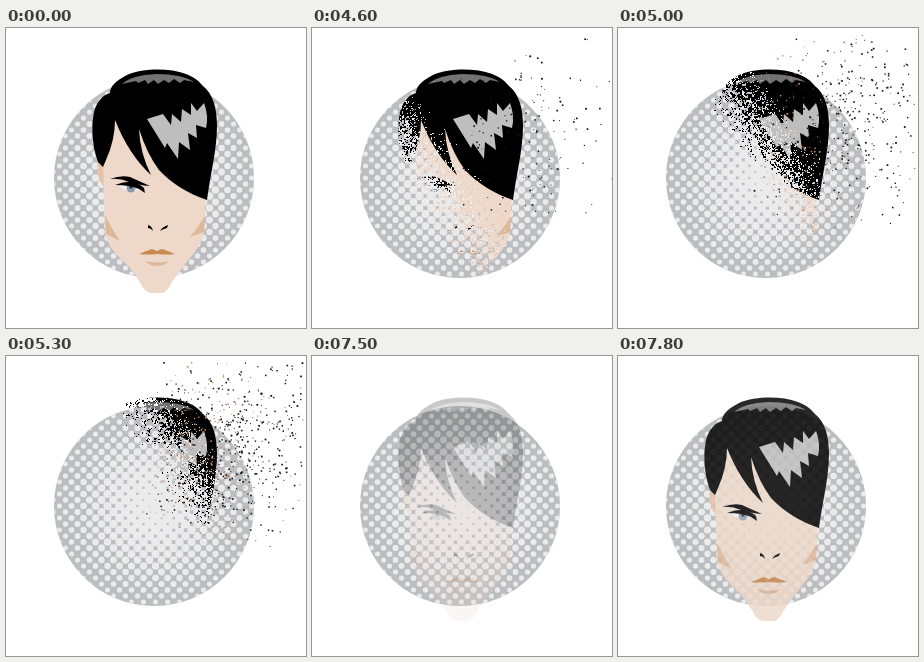
Animation of 300 by 300 pixels, one loop 7.9 s. Source, as an HTML page with a canvas:

```html
<!DOCTYPE html>
<html lang="en">
<head>
<meta charset="utf-8">
<title>Dissolving portrait</title>
<style>
html, body { margin: 0; width: 100%; height: 100%; overflow: hidden; background: #fff; }
canvas { display: block; width: 300px; height: 300px; }
</style>
</head>
<body>
<canvas id="stage" width="300" height="300"></canvas>
<script>
const SIZE = 300, LOOP = 7900, STEP = 100;
const DISSOLVE = 4000, GONE = 6000, RETURN = 7500;
const ctx = document.getElementById('stage').getContext('2d');

function layer(draw) {
  const c = document.createElement('canvas');
  c.width = c.height = SIZE;
  const g = c.getContext('2d', { willReadFrequently: true });
  draw(g);
  return { c, g };
}

function seeded(seed) {
  return () => {
    seed = (seed + 0x6D2B79F5) | 0;
    let t = Math.imul(seed ^ (seed >>> 15), 1 | seed);
    t = (t + Math.imul(t ^ (t >>> 7), 61 | t)) ^ t;
    return ((t ^ (t >>> 14)) >>> 0) / 4294967296;
  };
}

function fill(g, color, path) {
  g.fillStyle = color;
  g.fill(new Path2D(path));
}

function disc(g, color, x, y, r) {
  g.fillStyle = color;
  g.beginPath();
  g.arc(x, y, r, 0, Math.PI * 2);
  g.fill();
}

// Halftone disc: staggered dots that grow towards the middle
const backdrop = layer(g => {
  g.fillStyle = '#fff';
  g.fillRect(0, 0, SIZE, SIZE);
  disc(g, '#bcbdc1', 148, 150, 100);
  g.save();
  g.beginPath();
  g.arc(148, 150, 100.5, 0, Math.PI * 2);
  g.clip();
  const pitch = 12;
  for (let row = -18; row <= 18; row++) {
    for (let col = -10; col <= 10; col++) {
      const dx = (col + (row & 1) / 2) * pitch, dy = row * pitch / 2;
      const d = Math.hypot(dx, dy);
      if (d < 108) disc(g, '#ebebec', 149.5 + dx, 150 + dy, 5.7 - d * 0.033);
    }
  }
  g.restore();
});

const portrait = layer(g => {
  const skin = '#edd8ca', tan = '#dfb799', ink = '#000';
  // ear, face and cheek shadows
  fill(g, '#e6c2a8', 'M92 130 Q90 142 94 153 L99 161 L104 132Z');
  fill(g, skin, 'M97 130 L98 165 L99 204 Q102 219 112 228 L123 239 Q130 247 135 256 Q139 265 146 265 L157 265 Q162 263 166 254 Q174 242 184 230 Q195 217 198 205 L200 165 L190 90 L105 85Z');
  fill(g, tan, 'M99 187 Q105 200 114 213 L100 206Z');
  fill(g, tan, 'M199 188 Q192 200 184 209 L198 204Z');

  // hair with its parted fringe
  fill(g, ink, 'M92 134 C86 118 85 98 88 84 C91 73 97 67 104 65 C104 58 111 52 121 47 C138 40 163 40 180 46 C188 49 193 53 197 58 C207 66 211 80 211 98 C211 122 204 148 201 172 C183 166 166 156 153 142 Q141 126 133 101 Q134 125 145 147 Q123 127 109 92 Q109 112 100 132 L97 139Z');
  fill(g, '#737373', 'M116 56 Q126 47 150 46 Q176 46 188 54 L178 52 L174 55 L168 51 L163 55 L158 52 L152 56 L148 52 L142 56 L139 52 L132 55 L130 53Z');
  fill(g, '#bebebe', 'M141 91 L157 86 L165 97 L166 86 L175 94 L176 81 L185 87 L185 75 L191 83 L198 75 Q203 88 200 100 L190 97 L191 110 L182 105 L184 122 L173 114 L172 131 L161 115 L159 120Z');

  // brow and eye
  fill(g, ink, 'M104 151 Q115 147 124 149 L144 158 Q132 157 123 154 Q114 150 104 151Z');
  fill(g, '#f5f1ee', 'M113 158 Q124 154 135 161 Q125 167 113 158Z');
  disc(g, '#8c9dac', 125, 160, 4.5);
  disc(g, '#28313a', 125, 159, 1.8);
  fill(g, ink, 'M109 157 Q119 153 128 154 Q135 157 138 160 L139 165 L133 161 Q124 157 109 157Z');

  // nose and mouth
  fill(g, ink, 'M142 197 Q146 198 147 203 Q145 200 142 200Z');
  fill(g, ink, 'M162 197 Q156 199 154 203 Q157 201 161 200Z');
  fill(g, '#c98950', 'M133 226 Q140 223 146 221 L151 223 L156 221 Q163 223 169 226 Q160 227 151 226 Q142 227 133 226Z');
  fill(g, tan, 'M139 233 Q151 236 163 233 Q158 238 151 238 Q144 238 139 233Z');
});

// Each pixel falls away once the front passes its threshold
const rnd = seeded(41);
const pixels = portrait.g.getImageData(0, 0, SIZE, SIZE);
const coarse = Array.from({ length: SIZE * SIZE / 4 }, rnd);
const erode = new Float32Array(SIZE * SIZE);
for (let y = 0; y < SIZE; y++) {
  for (let x = 0; x < SIZE; x++) {
    const cell = coarse[(y >> 1) * (SIZE / 2) + (x >> 1)];
    erode[y * SIZE + x] = 1.2 * x - 0.8 * y + (cell + rnd() - 1) * 52;
  }
}

const specks = Array.from({ length: 1400 }, () => {
  const birth = 2 + 14 * Math.sqrt(rnd());
  const warm = birth > 7 && rnd() < 0.25;
  return {
    birth,
    life: 4 + rnd() * 4,
    x: 135 + rnd() * 75,
    y: 45 + rnd() * (170 - birth * 4),
    dx: 10 + rnd() * (warm ? 40 : 120),
    dy: 30 - rnd() * 100,
    size: 0.7 + rnd() * 1.1,
    color: warm ? '#c98f68' : '#111'
  };
});

const worn = layer(() => {});

function drawWorn(step) {
  const front = 15 * step - 74;
  const img = new ImageData(new Uint8ClampedArray(pixels.data), SIZE, SIZE);
  for (let i = 0; i < erode.length; i++) {
    if (erode[i] < front) img.data[i * 4 + 3] = 0;
  }
  worn.g.putImageData(img, 0, 0);
  ctx.drawImage(worn.c, 0, 0);
}

function drawSpecks(step) {
  for (const s of specks) {
    const age = step - s.birth;
    if (age < 0 || age > s.life) continue;
    const out = 1 - Math.exp(-age / 1.5);
    const x = s.x + s.dx * out + age * 2;
    const y = s.y + s.dy * out - age * 2;
    if (y < 5) continue;
    ctx.fillStyle = s.color;
    ctx.fillRect(x, y, s.size, s.size);
  }
}

function render(t) {
  ctx.drawImage(backdrop.c, 0, 0);
  if (t < DISSOLVE) {
    ctx.drawImage(portrait.c, 0, 0);
  } else if (t < GONE) {
    const step = Math.floor((t - DISSOLVE) / STEP) + 1;
    drawWorn(step);
    drawSpecks(step);
  } else if (t >= RETURN) {
    ctx.globalAlpha = 0.21 * (Math.floor((t - RETURN) / STEP) + 1);
    ctx.drawImage(portrait.c, 0, 0);
    ctx.globalAlpha = 1;
  }
}

const start = performance.now();
function frame() {
  render((performance.now() - start) % LOOP);
  requestAnimationFrame(frame);
}
frame();
</script>
</body>
</html>
```
